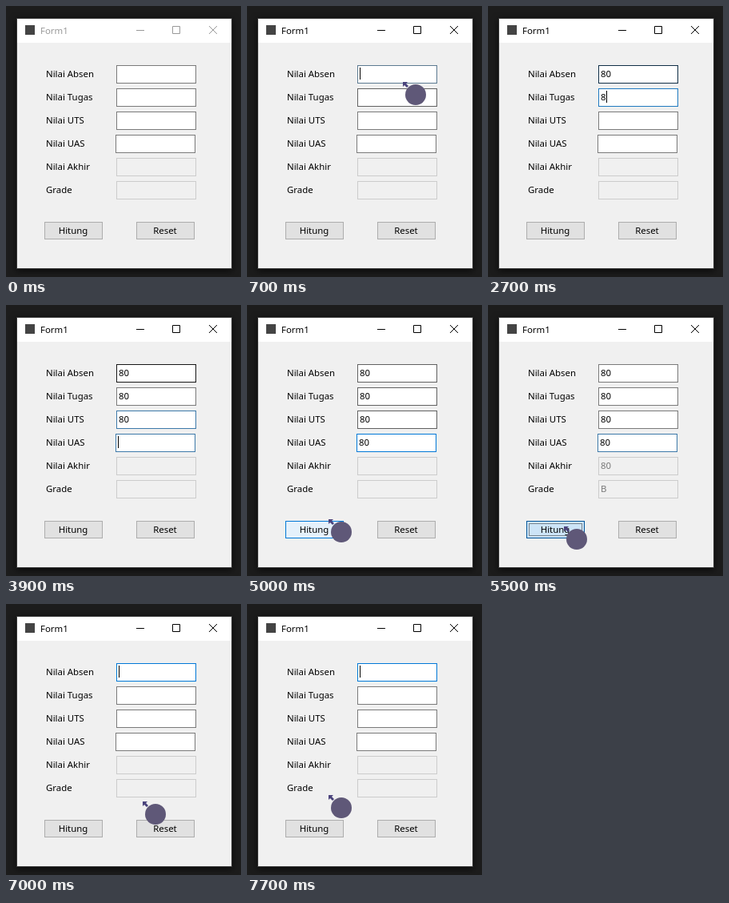
An HTML page for the animation above (8 s loop, 294 by 339 pixels).

```html
<!DOCTYPE html>
<html lang="id">
<head>
<meta charset="utf-8">
<title>Form1</title>
<style>
html, body { margin: 0; width: 100%; height: 100%; overflow: hidden; background: #1c1c1c; }
svg { display: block; width: 294px; height: 339px; }
text { font: 11.4px "Noto Sans", "Open Sans", sans-serif; white-space: pre; }
#window { filter: drop-shadow(0 2px 4px #000b); }
</style>
</head>
<body>
<svg id="stage" viewBox="0 0 294 339">
  <g id="window">
    <rect x="13.5" y="15.5" width="269" height="313" fill="#f0f0f0" stroke="#3a3a3a"/>
    <rect x="14" y="16" width="268" height="30" fill="#fff"/>
  </g>
  <rect x="24" y="24" width="12" height="12" fill="#444"/>
  <text id="title" x="43" y="35">Form1</text>
  <path id="caption" fill="none" d="M163 30.5h10M208.5 25.5h9v9h-9zM254 25l10 10M264 25l-10 10"/>
  <g id="form"></g>
  <rect id="caret" width="1" height="15"/>
  <g id="beam">
    <path d="M-3 -7.5h2.5q.5 0 .5 1V6.5q0 1 -.5 1H-3M3 -7.5H.5q-.5 0 -.5 1M3 7.5H.5q-.5 0 -.5 -1" fill="none" stroke="#625c70"/>
    <g fill="#8a559f" stroke="#fff" stroke-width=".6">
      <path d="M17 9c4 0 4 4 6.500 6c2 3 0 6 -3 5.500q-3.500 -1 -7 0c-3 .5 -5 -2.500 -3 -5.500c2.500 -2 2.500 -6 6.500 -6z"/>
      <ellipse cx="10" cy="10" rx="2.300" ry="2.600"/>
      <ellipse cx="14.500" cy="5" rx="2.300" ry="3"/>
      <ellipse cx="19.500" cy="5" rx="2.300" ry="3"/>
      <ellipse cx="24" cy="10" rx="2.300" ry="2.600"/>
    </g>
  </g>
  <g id="pointer">
    <ellipse cx="16" cy="16" rx="13" ry="13" fill="#5f5878"/>
    <path d="M0 0h6l-2 2 3 3-2 2-3-3-2 2z" fill="#4a437c"/>
  </g>
</svg>
<script>
const LOOP = 8000, STEP = 100;
const BLUE = [0, 120, 215], HOT = [23, 23, 23], GREY = [122, 122, 122];
const LABELS = ['Absen', 'Tugas', 'UTS', 'UAS', 'Akhir'].map(s => 'Nilai ' + s).concat('Grade');
const TYPED_AT = [2100, 2700, 3400, 4000];
const RESULT_AT = 5500, RESET_AT = 6600, ACTIVE_AT = 700;
const HITUNG = 6, RESET = 7;
const FOCUS = [[0, -1], [ACTIVE_AT, 0], [2500, 1], [3100, 2], [3800, 3], [5400, HITUNG], [6500, RESET], [RESET_AT, 0]];
const CARET_OFF = [[1500, 1900], [4600, 5400], [7200, 7700]];
// Mouse position over time: [ms, x, y]
const PATH = [
  [200, 284, 170], [600, 196, 95], [1000, 192, 93], [1400, 192, 93], [1500, 192, 92],
  [4600, 192, 92], [4700, 188, 88], [4800, 175, 113], [4900, 150, 150], [5000, 102, 268],
  [5400, 95, 277], [5500, 95, 277], [5700, 165, 288], [6000, 165, 288], [6200, 179, 282],
  [6400, 179, 282], [6500, 179, 285], [6800, 179, 286], [7000, 171, 247],
  [7300, 178, 170], [7500, 102, 239]
];

const $ = id => document.getElementById(id);
const set = (el, attrs) => { for (const k in attrs) el.setAttribute(k, attrs[k]); };
const show = (el, on) => { el.style.display = on ? '' : 'none'; };

function add(tag, attrs, text = '') {
  const el = document.createElementNS('http://www.w3.org/2000/svg', tag);
  set(el, attrs);
  el.textContent = text;
  return $('form').appendChild(el);
}
const box = (x, y, width, height, fill, stroke) =>
  add('rect', { x: x + .5, y: y + .5, width: width - 1, height: height - 1, fill, stroke });

const fields = LABELS.map((label, i) => {
  const x = i === 3 ? 137 : 138, y = 74 + 29 * i, on = i < 4;
  add('text', { x: 50, y: y + 15 }, label);
  return {
    x, y, w: 100, h: 23,
    rect: box(x, y, 100, 23, on ? '#fff' : '#f0f0f0', '#ccc'),
    text: add('text', { x: x + 3, y: y + 15, fill: on ? '#000' : '#777' })
  };
});

const buttons = [[48, 'Hitung'], [163, 'Reset']].map(([x, label]) => {
  const y = 270, w = 73, h = 22;
  const rect = box(x, y, w, h, '#e1e1e1', '#adadad');
  const ring = add('rect', {
    x: x + 1.5, y: y + 1.5, width: w - 3, height: h - 3, fill: 'none', stroke: '#0078d7'
  });
  const dots = add('rect', {
    x: x + 3.5, y: y + 3.5, width: w - 7, height: h - 7, fill: 'none', stroke: '#222', 'stroke-dasharray': '1 1'
  });
  add('text', { x: x + w / 2 - .5, y: y + 15, 'text-anchor': 'middle' }, label);
  return { x, y, w, h, rect, ring, dots };
});

function mouse(t) {
  const i = PATH.findIndex(p => p[0] > t);
  if (i < 0) return PATH[PATH.length - 1].slice(1);
  if (i === 0) return [400, 170];
  const [t0, x0, y0] = PATH[i - 1], [t1, x1, y1] = PATH[i];
  const k = (t - t0) / (t1 - t0);
  return [Math.round(x0 + (x1 - x0) * k), Math.round(y0 + (y1 - y0) * k)];
}

function hovered(t, b) {
  const [x, y] = mouse(t).map(v => v + 3);
  return x >= b.x && x < b.x + b.w && y >= b.y && y < b.y + b.h;
}

const focusAt = t => FOCUS.filter(f => f[0] <= t).pop()[1];

// Borders fade linearly: average the wanted colour over the last four steps.
function border(t, i) {
  const sum = [0, 0, 0];
  for (let k = 0; k < 4; k++) {
    const s = Math.max(0, t - k * STEP);
    const c = focusAt(s) === i ? BLUE : hovered(s, fields[i]) ? HOT : GREY;
    c.forEach((v, n) => { sum[n] += v / 4; });
  }
  return `rgb(${sum.map(Math.round)})`;
}

function value(t, i) {
  if (t >= RESET_AT) return '';
  if (i > 3) return t < RESULT_AT ? '' : i === 4 ? '80' : 'B';
  return '80'.slice(0, Math.max(0, (t - TYPED_AT[i]) / STEP + 1));
}

function draw(t) {
  const focus = focusAt(t), ink = t < ACTIVE_AT ? '#999' : '#000';
  set($('title'), { fill: ink });
  set($('caption'), { stroke: ink });

  fields.forEach((f, i) => {
    f.text.textContent = value(t, i);
    if (i < 4) set(f.rect, { stroke: border(t, i) });
  });

  buttons.forEach((b, i) => {
    const hot = hovered(t, b), focused = focus === HITUNG + i;
    const down = focused && hot;
    set(b.rect, {
      fill: down ? '#cce4f7' : hot ? '#e5f1fb' : '#e1e1e1',
      stroke: down ? '#005499' : hot || focused ? '#0078d7' : '#adadad'
    });
    show(b.ring, focused && !down);
    show(b.dots, focused);
  });

  const f = fields[focus];
  show($('caret'), f && !CARET_OFF.some(([a, b]) => t >= a && t < b));
  if (f) set($('caret'), { x: f.x + 3 + Math.round(value(t, focus).length * 6.5), y: f.y + 3 });

  const [x, y] = mouse(t);
  const visible = t >= 200 && (t < 2100 || t >= 4600);
  const typing = fields.slice(0, 4).some(b => hovered(t, b));
  show($('beam'), visible && typing);
  show($('pointer'), visible && !typing);
  set($('beam'), { transform: `translate(${x + .5} ${y})` });
  set($('pointer'), { transform: `translate(${x} ${y})` });
}

const start = performance.now();
function tick() {
  const t = (performance.now() - start) % LOOP;
  draw(Math.floor(t / STEP) * STEP);
  requestAnimationFrame(tick);
}
tick();
</script>
</body>
</html>
```
